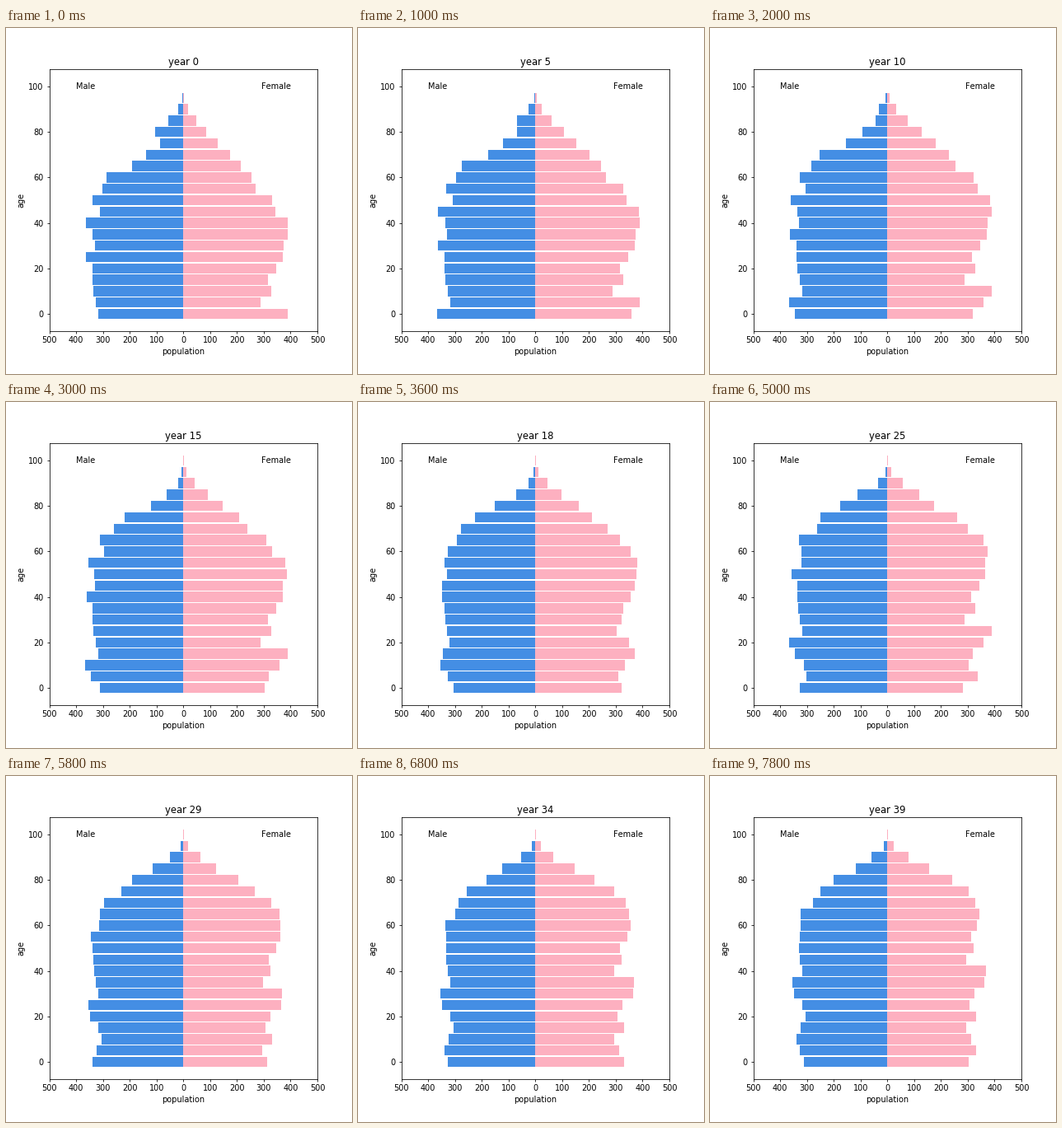
Recreate the animation shown at these times as a matplotlib script. Size 420 by 420 pixels, loop 8000 ms.

```python
import matplotlib.pyplot as plt
import numpy as np
from matplotlib.animation import FuncAnimation

YEARS = 40
AGES = np.arange(0, 101, 5)

# Births curve: size of the five-year cohort ending at each key year
BIRTH_YEARS = [-95, -80, -75, -65, *range(-60, 41, 5)]
BOYS = [80, 185, 120, 213, 304, 313, 346, 315, 366, 340, 332, 364, 340,
        339, 336, 327, 317, 366, 345, 312, 303, 328, 342, 322, 308]
GIRLS = [45, 135, 168, 233, 268, 277, 338, 347, 390, 392, 376, 372, 347,
         316, 329, 289, 389, 359, 319, 303, 338, 283, 320, 334, 295]


def survival(age, risk):
    """Share still alive at an age, under Gompertz mortality."""
    return np.exp(-0.0474 * risk * np.exp(0.113 * (age - 60)))


def population(births, year, risk):
    """People in each age group: their cohort's births times survival."""
    born = np.interp(year - AGES, BIRTH_YEARS, births)
    return np.floor(born * survival(AGES, risk) + 0.01)


def draw(year):
    for bar, n in zip(left, population(BOYS, year, 1.25)):
        bar.set_width(-n)
    for bar, n in zip(right, population(GIRLS, year, 1.0)):
        bar.set_width(n)
    title.set_text(f"year {year}")
    return [*left, *right, title]


plt.rcParams["font.family"] = "DejaVu Sans"
plt.rcParams["text.kerning_factor"] = 6
fig, ax = plt.subplots(figsize=(6, 6), dpi=70)
fig.subplots_adjust(left=0.125, right=0.9, bottom=0.125, top=0.88)

nobody = np.zeros(len(AGES))
left = ax.barh(AGES, nobody, height=4.5, color="#448ee4")
right = ax.barh(AGES, nobody, height=4.5, color="#fdb0c0")
ax.text(-400, 100, "Male", va="center")
ax.text(290, 100, "Female", va="center")

ticks = np.arange(-500, 501, 100)
ax.set_xlim(-500, 500)
ax.set_ylim(-7.475, 107.475)
ax.set_xticks(ticks, [str(abs(t)) for t in ticks])
ax.set_yticks(range(0, 101, 20))
ax.set_xlabel("population")
ax.set_ylabel("age")
title = ax.set_title("year 0")

anim = FuncAnimation(fig, draw, frames=YEARS, interval=200,
                     repeat=True, repeat_delay=0)
plt.show()
```
